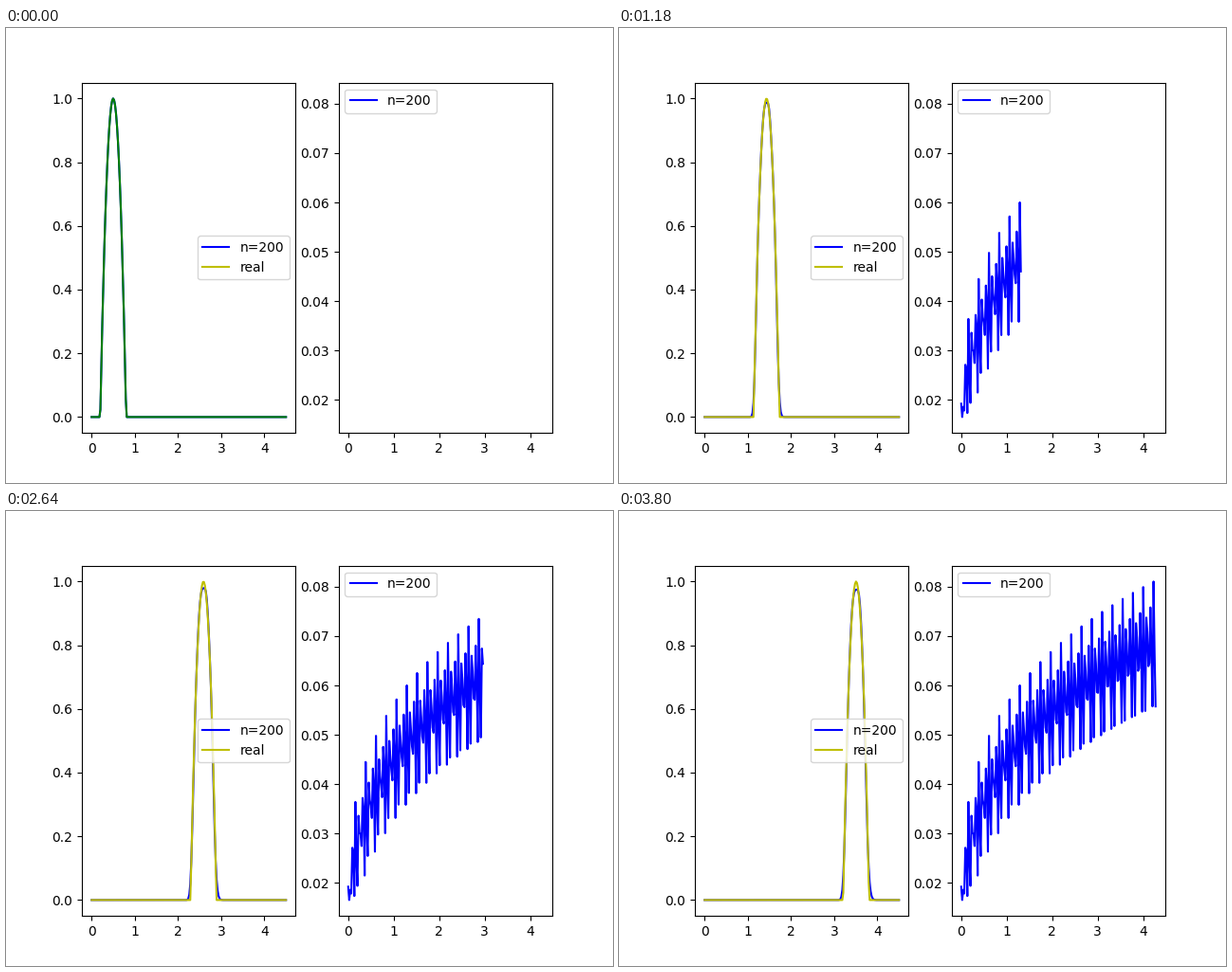
A matplotlib script for the animation above (3820 ms loop, 640x480 px).

```python
import numpy as np
import matplotlib.pyplot as plt
from matplotlib.animation import FuncAnimation

N = 200
SPEED = 0.7
COURANT = 0.7
STEPS = 190

x = np.linspace(0, 4.5, N)
dt = COURANT * (x[1] - x[0]) / SPEED


def bump(s):
    """Parabolic hump of height 1 on (0.2, 0.8), zero elsewhere."""
    return np.maximum(0, 1 - ((s - 0.5) / 0.3) ** 2)


def advance(u):
    """One advection step: Lax-Wendroff fluxes with the van Leer limiter."""
    d = np.diff(u, prepend=0, append=0)
    back, ahead = d[:-1], d[1:]
    product = back * ahead
    total = np.where(product > 0, back + ahead, 1)
    slope = np.where(product > 0, 2 * product / total, 0)
    flux = u + 0.5 * (1 - COURANT) * slope
    return u - COURANT * np.diff(flux, prepend=0)


waves = [bump(x)]
for _ in range(STEPS):
    waves.append(advance(waves[-1]))
reals = [bump(x - SPEED * k * dt) for k in range(STEPS + 1)]
errors = np.array([np.abs(w - r).max() for w, r in zip(waves[1:], reals[1:])])
times = np.arange(STEPS) * dt

fig, (ax_wave, ax_err) = plt.subplots(1, 2, figsize=(6.4, 4.8), dpi=100)

wave_line, = ax_wave.plot(x, waves[0], "b", label="n=200")
real_line, = ax_wave.plot([], [], "y", label="real")
start_line, = ax_wave.plot(x, waves[0], "g")
ax_wave.legend(loc="center right")

err_line, = ax_err.plot(times, errors, "b", label="n=200")
ax_err.legend(loc="upper left")

for ax in (ax_wave, ax_err):
    ax.set_xlim(ax.get_xlim())
    ax.set_ylim(ax.get_ylim())


def draw(k):
    wave_line.set_data(x, waves[k])
    if k:
        real_line.set_data(x, reals[k])
    else:
        real_line.set_data([], [])
    start_line.set_visible(k == 0)
    err_line.set_data(times[:k], errors[:k])
    return wave_line, real_line, start_line, err_line


anim = FuncAnimation(fig, draw, frames=STEPS + 1, init_func=lambda: draw(0),
                     interval=20, repeat=True, repeat_delay=0)
plt.show()
```
